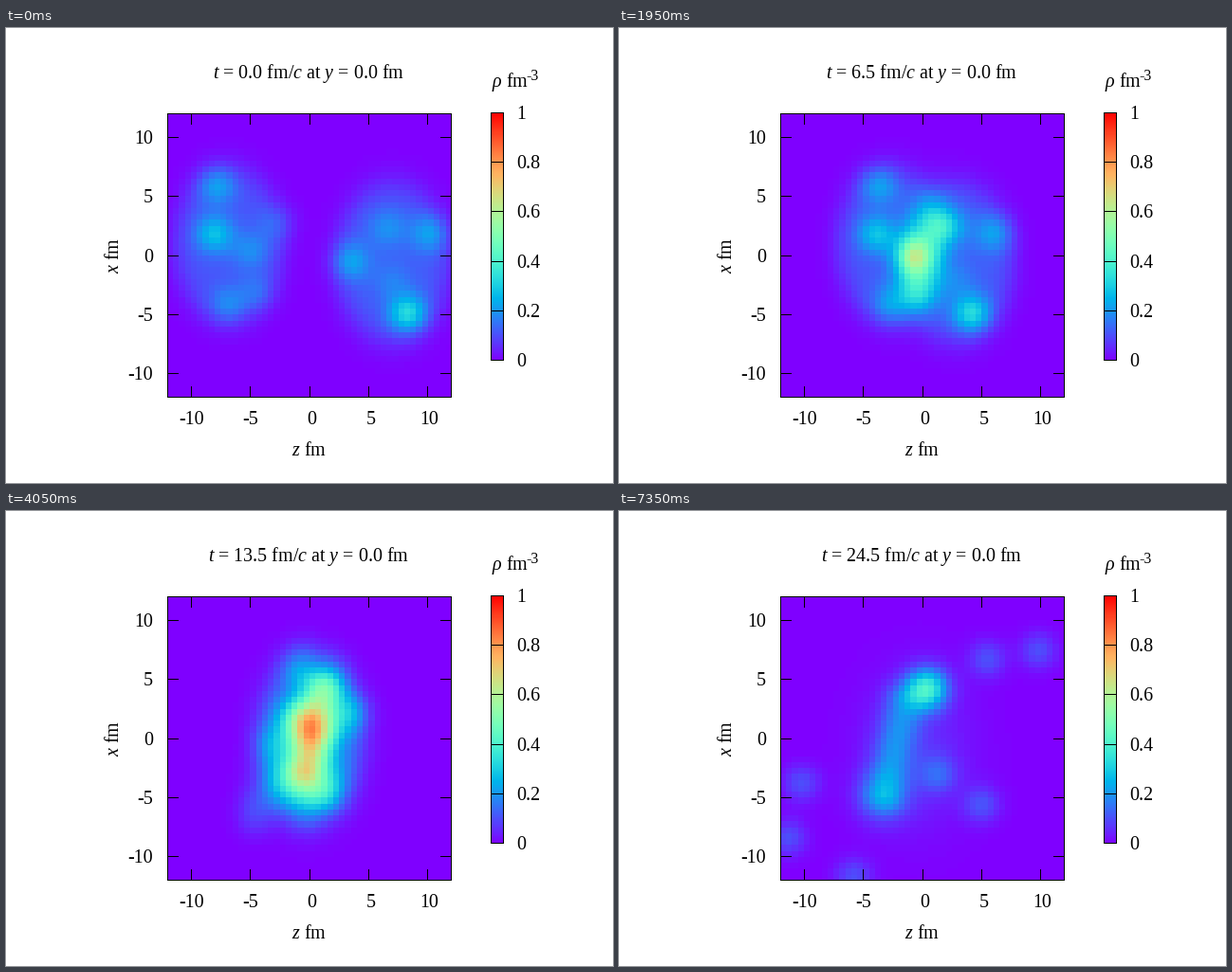
A matplotlib script for the animation above (7500 ms loop, 640 px wide and 480 px high).

```python
import numpy as np
import matplotlib.pyplot as plt
from matplotlib.animation import FuncAnimation

plt.rcParams.update({
    "font.family": "Liberation Serif",
    "mathtext.fontset": "custom",
    "mathtext.rm": "Liberation Serif",
    "mathtext.it": "Liberation Serif:italic",
})

W, H, DPI = 640, 480, 100
FRAMES, STEP_MS, DT = 50, 150, 0.5
LEFT, RIGHT, TOP, BOTTOM = 170.5, 469.5, 90.5, 389.5
R = 12.0
SPEED = 0.635      # drift of each nucleus, in c
SQUEEZE = 4.0      # extra density where the nuclei overlap
T_TOUCH, T_STOP, T_BURST, T_END = 5, 10.5, 17, 24.5

cell = np.arange(-R, R, 0.5) + 0.25
Z, X = np.meshgrid(cell, cell)

# Dense spots in each nucleus: z, x, extra density
SPOTS_L = [(-8, 1.8, .17), (-7.8, 5.9, .13), (-5, .4, .08),
           (-6.9, -4.2, .09), (-2.7, 2.7, .06), (-4.4, -3.2, .06)]
SPOTS_R = [(8.3, -4.9, .22), (10.2, 1.9, .12), (3.5, -.5, .12),
           (6.6, 2.3, .08), (7, -2.2, .05)]

# Fireball key points: z, x, density (the ridge runs from head to tail)
KEY_T = (T_STOP, T_BURST, 21.5, T_END)
HEAD = [(1.2, 4, .14), (1.2, 4, .60), (.3, 3, .28), (-1.5, 3, .15)]
TAIL = [(-.8, -2.5), (.2, -2.5), (-2.2, -3.5), (-3.2, -4.6)]
PEAK = [(-.3, .3, .18), (0, .9, .27), (.4, 3.2, .36), (.4, 4.2, .36)]
FOOT = [(-2, -4, .10), (-2.2, -4, .25), (-3.6, -3.8, .05), (-3.4, -4.9, .10)]

# Fragment paths: z, x at the burst and at the end
FRAGMENTS = [(4.5, 6.4, 9.8, 7.4), (1.4, 6.9, 5.5, 6.7),
             (-6.4, -5, -10.2, -3.8), (-6.8, -7.5, -11.3, -8.4),
             (-2, -8.3, -5.8, -11.7), (2, -3.2, 5, -5.6), (.5, -4.5, 1.3, -3)]


def ramp(t, t0, t1):
    return float(np.clip((t - t0) / (t1 - t0), 0, 1))


def at(t, keys):
    return [np.interp(t, KEY_T, col) for col in zip(*keys)]


def blob(z, x, amp, sz=1.1, sx=None):
    return amp * np.exp(-((Z - z) / sz) ** 2 / 2 - ((X - x) / (sx or sz)) ** 2 / 2)


def ridge(z0, x0, z1, x1, amp, s=1.2):
    """Gaussian falling off with the distance from a segment."""
    dz, dx = z1 - z0, x1 - x0
    u = np.clip(((Z - z0) * dz + (X - x0) * dx) / (dz * dz + dx * dx), 0, 1)
    d2 = (Z - z0 - u * dz) ** 2 + (X - x0 - u * dx) ** 2
    return amp * np.exp(-d2 / (2 * s * s))


def nucleus(z, x, rz, rx, base, spots, shift):
    r = np.hypot((Z - z - shift) / rz, (X - x) / rx)
    disc = base / (1 + np.exp(8 * (r - 1)))
    return disc + sum(blob(sz + shift, sx, a) for sz, sx, a in spots)


def nuclei(t):
    drift = SPEED * min(t, T_STOP)
    a = nucleus(-6.8, .9, 4.5, 6.4, .11, SPOTS_L, drift)
    b = nucleus(7, -.6, 4.7, 6.6, .12, SPOTS_R, -drift)
    return a + b + SQUEEZE * a * b


def fireball(t):
    z, x, amp = at(t, HEAD)
    return (ridge(z, x, *at(t, TAIL), amp) + blob(*at(t, PEAK), sz=1.2)
            + blob(*at(t, FOOT), sz=1.6))


def debris(t):
    grow = ramp(t, T_BURST, T_END)
    field = blob(-.4, -1, .10 - .04 * grow, 2 + 1.3 * grow, 3.8 + .8 * grow)
    u = (t - T_BURST) / (T_END - T_BURST)
    for z0, x0, z1, x1 in FRAGMENTS:
        field = field + blob(z0 + (z1 - z0) * u, x0 + (x1 - x0) * u, .10)
    return field


def density(t):
    burst = ramp(t, T_STOP, T_BURST)
    rho = ((1 - burst) * nuclei(t) + ramp(t, T_TOUCH, T_STOP) * fireball(t)
           + burst * debris(t))
    return np.clip(rho, 0, 1)


fig = plt.figure(figsize=(W / DPI, H / DPI), dpi=DPI, facecolor="white")
ax = fig.add_axes((0, 0, 1, 1))
ax.axis("off")


def label(x, y, s, size=20, **kw):
    return ax.text(x, y, s, fontsize=size * 72 / DPI, color="black",
                   va="baseline", **kw)


def line(xs, ys):
    ax.plot(xs, ys, color="black", lw=72 / DPI, snap=False,
            solid_capstyle="projecting", zorder=3)


def panel(data, x0, x1, y0, y1):
    """Colour map with a one-pixel frame."""
    image = ax.imshow(data, extent=(x0 - .5, x1 + .5, y1 + .5, y0 - .5),
                      cmap="rainbow", vmin=0, vmax=1, aspect="auto",
                      interpolation="nearest")
    line((x0, x1, x1, x0, x0), (y0, y0, y1, y1, y0))
    return image


def px(z):
    return np.floor(LEFT + (z + R) / (2 * R) * (RIGHT - LEFT)) + .5


def py(x):
    return np.floor(BOTTOM - (x + R) / (2 * R) * (BOTTOM - TOP)) + .5


heat = panel(density(0)[::-1], LEFT, RIGHT, TOP, BOTTOM)
TICK = 11
for v in range(-10, 11, 5):
    for edge, step in ((TOP, TICK), (BOTTOM, -TICK)):
        line((px(v), px(v)), (edge, edge + step))
    for edge, step in ((LEFT, TICK), (RIGHT, -TICK)):
        line((edge, edge + step), (py(v), py(v)))
    label(px(v) + (2 if v >= 0 else 0), 418, str(v), ha="center")
    label(155, py(v) + 6.5, str(v), ha="right")

BAR_L, BAR_R, BAR_T, BAR_B = 511.5, 524.5, 89.5, 350.5
panel(np.linspace(1, 0, 256)[:, None], BAR_L, BAR_R, BAR_T, BAR_B)
for k in range(6):
    y = np.floor(BAR_B - k / 5 * (BAR_B - BAR_T)) + .5
    line((BAR_L, BAR_R), (y, y))
    label(538.5, y + 6.5, f"{k / 5:g}", ha="left")

label(319, 451, "$z$ fm", ha="center")
label(119, 240, "$x$ fm", ha="center", rotation=90, rotation_mode="anchor")
label(511.5, 62, r"$\rho$ fm", ha="left")
label(548.5, 55, "-3", size=16, ha="left")
title = label(319.5, 53, "", ha="center")

ax.set_xlim(0, W)
ax.set_ylim(H, 0)


def draw(i):
    t = i * DT
    heat.set_data(density(t)[::-1])
    title.set_text(f"$t$ = {t:.1f} fm/$c$ at $y$ = 0.0 fm")
    return heat, title


anim = FuncAnimation(fig, draw, frames=FRAMES, interval=STEP_MS,
                     repeat=True, repeat_delay=0)
plt.show()
```
